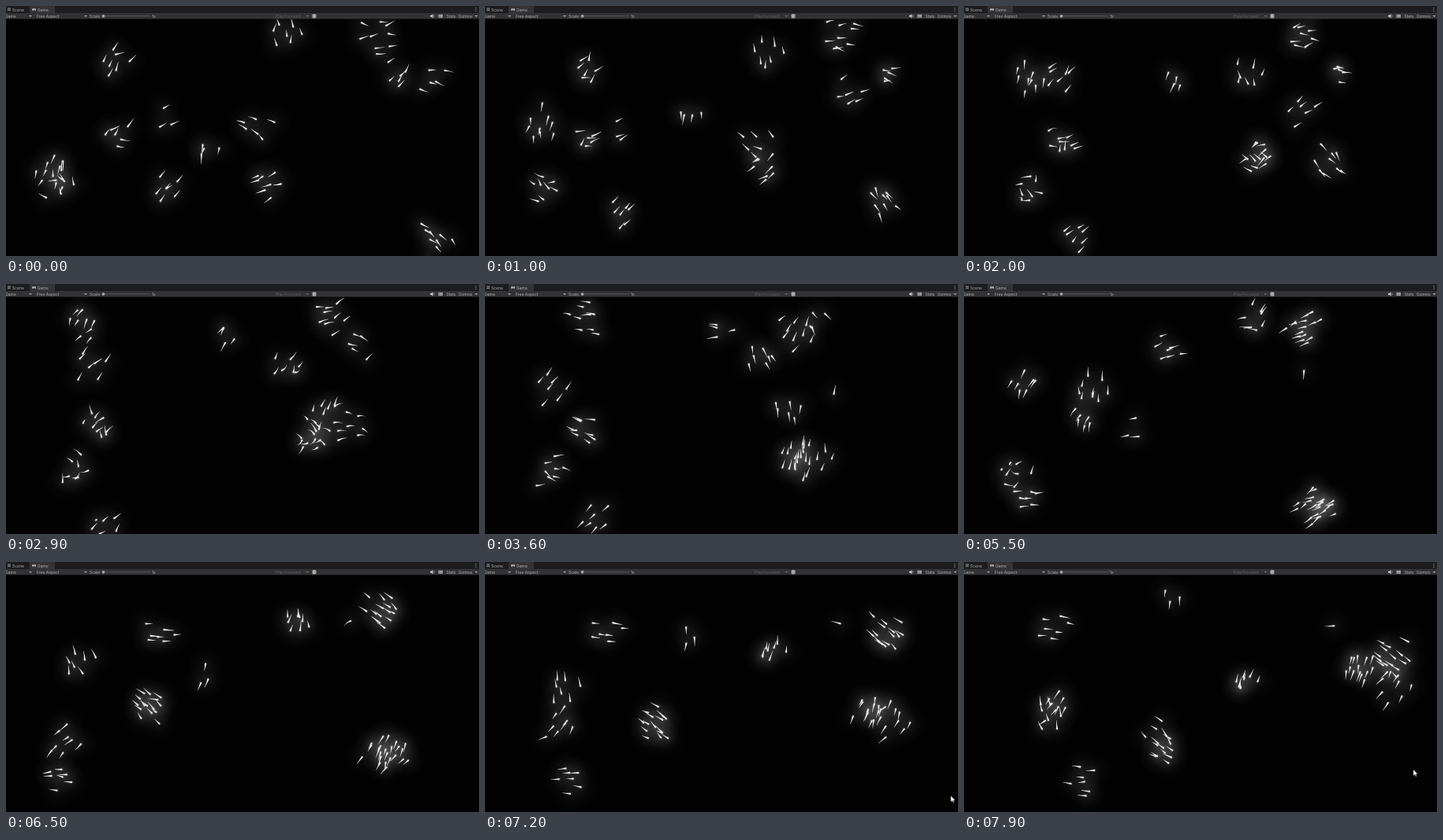
Write an HTML page that moves like this. It is 600x318 px and loops after 8000 ms.

```html
<!DOCTYPE html>
<html lang="en">
<head>
<meta charset="utf-8">
<title>Fish schools</title>
<style>
  html, body { margin: 0; width: 100%; height: 100%; overflow: hidden; background: #020202; }
  svg { display: block; width: 100vw; height: 100vh; }
  text { font: 5px Inter, Roboto, sans-serif; fill: #b4b4b4; }
  .dim { fill: #606060; }
</style>
</head>
<body>
<svg viewBox="0 0 600 318">
  <defs>
    <radialGradient id="halo">
      <stop offset="0" stop-color="#fff" stop-opacity=".16"/>
      <stop offset=".15" stop-color="#fff" stop-opacity=".045"/>
      <stop offset=".5" stop-color="#fff" stop-opacity=".018"/>
      <stop offset="1" stop-color="#fff" stop-opacity="0"/>
    </radialGradient>
  </defs>
  <rect width="600" height="318" fill="#020202"/>
  <g id="halos" fill="url(#halo)"></g>
  <g id="fish" fill="#ececec"></g>

  <g id="bar">
    <rect width="600" height="9" fill="#1d1d1f"/>
    <rect x="30" width="32" height="9" fill="#343436"/>
    <rect y="9" width="600" height="7.5" fill="#333335"/>
    <path d="M0 16.5H600" stroke="#171717" stroke-width=".6"/>
    <path d="M2 3.2H6M2 5.4H6M3 2.3V6.4M5 2.3V6.4" stroke="#aaa" stroke-width=".6"/>
    <path d="M33 3.2H38V5.8H36.2L35.5 5L34.8 5.8H33Z" fill="#aaa"/>
    <text x="8" y="6.6">Scene</text>
    <text x="40" y="6.6">Game</text>
    <text x="-1" y="14.6">Game</text>
    <text x="39" y="14.6">Free Aspect</text>
    <text x="106" y="14.6">Scale</text>
    <path d="M122 12.8H183" stroke="#5c5c5c" stroke-width=".8"/>
    <circle cx="123.5" cy="12.8" r="1.9" fill="#a5a5a5"/>
    <text x="185" y="14.6">1x</text>
    <text x="342" y="14.6" class="dim">Play Focused</text>
    <ellipse cx="391" cy="12.8" rx="2.3" ry="2.8" fill="#aaa"/>
    <path d="M388 11.2H394M388 13H394M388 14.8H394" stroke="#aaa" stroke-width=".6"/>
    <path d="M538 11.8H539.5L541.5 10.2V15.4L539.5 13.8H538Z" fill="#ccc"/>
    <path d="M542.6 11.3Q544 12.8 542.6 14.3" fill="none" stroke="#ccc" stroke-width=".6"/>
    <rect x="548.5" y="10.8" width="5.5" height="4" fill="#aaa"/>
    <path d="M549.3 12H553.2M549.3 13.6H553.2" stroke="#444" stroke-width=".6" stroke-dasharray=".7 .5"/>
    <text x="558.5" y="14.6">Stats</text>
    <text x="574" y="14.6">Gizmos</text>
    <path d="M29 12h4l-2 2zM99 12h4l-2 2zM594.5 12h4l-2 2z" fill="#aaa"/>
    <path d="M380.5 12h4l-2 2z" fill="#707070"/>
    <path d="M596 2.2v1M596 4.2v1M596 6.2v1" stroke="#aaa"/>
  </g>
  <path id="cursor" d="M0 0V8L1.9 6.3L3.1 9L4.3 8.5L3.1 5.8H5.6Z" fill="#fff" stroke="#222" stroke-width=".4"/>
</svg>
<script>
const LOOP = 8, STEP = .1;
const WAYPOINT_TIMES = [0, 2.9, 4.4, 6, 7.9];
const byId = id => document.getElementById(id);

let seed = 11;
const random = () => (seed = seed * 16807 % 2147483647) / 2147483647;
const spread = amount => (random() * 2 - 1) * amount;

function add(parent, tag, attributes = {}) {
  const node = document.createElementNS('http://www.w3.org/2000/svg', tag);
  for (const name in attributes) node.setAttribute(name, attributes[name]);
  return byId(parent).appendChild(node);
}

// Smooth curve through the waypoints; it runs on past both ends.
function route(points, time) {
  const T = WAYPOINT_TIMES, last = T.length - 1;
  let k = 0;
  while (k < last - 1 && time > T[k + 1]) k++;
  const span = T[k + 1] - T[k], u = (time - T[k]) / span;
  const slope = (i, axis) => {
    const a = Math.max(0, i - 1), b = Math.min(last, i + 1);
    return (points[b][axis] - points[a][axis]) / (T[b] - T[a]) * span;
  };
  return [0, 1].map(axis => {
    const p = points[k][axis], q = points[k + 1][axis];
    const m = slope(k, axis), n = slope(k + 1, axis);
    return p + u * (m + u * (3 * (q - p) - 2 * m - n + u * (2 * (p - q) + m + n)));
  });
}

// Fish fill a disc around the school's route, each with its own slow wander.
const fish = [];
function school(count, ...points) {
  const radius = 7 * Math.sqrt(count), turn = random() * 7;
  for (let i = 0; i < count; i++) {
    const r = count > 1 ? radius * Math.sqrt((i + .5) / count) : 0;
    const angle = turn + i * 2.4;
    fish.push({
      points,
      x: r * Math.cos(angle) + spread(3),
      y: r * Math.sin(angle) + spread(3),
      phase: random() * 7,
      pace: 1.4 + spread(.5),
      length: 10.5 + spread(2.5),
      lean: spread(.35),
      halo: add('halos', 'circle', { r: 23 }),
      body: add('fish', 'path')
    });
  }
}

school(9, [540, 295], [432, 178], [412, 284], [475, 266], [542, 155]);
school(8, [332, 222], [395, 188], [392, 284], [460, 268], [500, 135]);
school(6, [498, 90], [404, 165], [404, 282], [480, 262], [505, 130]);
school(9, [472, 38], [412, 42], [388, 88], [458, 50], [547, 118]);
school(4, [545, 92], [442, 72], [397, 24], [368, 55], [355, 154]);
school(4, [252, 180], [276, 64], [328, 62], [370, 58], [355, 154]);
school(7, [355, 33], [357, 104], [330, 62], [222, 92], [112, 80]);
school(6, [318, 155], [385, 200], [385, 92], [455, 55], [545, 130]);
school(9, [60, 210], [100, 49], [165, 68], [168, 165], [250, 228]);
school(6, [142, 165], [114, 180], [147, 187], [165, 172], [252, 240]);
school(8, [66, 225], [90, 240], [68, 236], [66, 240], [115, 182]);
school(7, [203, 234], [128, 310], [157, 273], [60, 275], [155, 278]);
school(7, [138, 72], [106, 106], [62, 165], [88, 118], [108, 195]);
school(3, [195, 142], [115, 185], [147, 187], [238, 168], [258, 42]);
school(1, [525, 100], [464, 92], [432, 174], [433, 85], [474, 74]);

function place({ points, x, y, phase, pace }, time) {
  const [cx, cy] = route(points, time);
  return [
    cx + x + 5 * Math.sin(pace * time + phase),
    cy + y + 5 * Math.cos(pace * time + phase * 2)
  ];
}

function heading(one, time) {
  const [x1, y1] = place(one, time - .15), [x2, y2] = place(one, time + .15);
  return Math.atan2(y2 - y1, x2 - x1) + one.lean * Math.sin(2 * time + one.phase);
}

function drawFish(one, time) {
  const { halo, body, length } = one;
  const [x, y] = place(one, time);
  const now = heading(one, time), past = heading(one, time - .25);
  const dx = Math.cos(now), dy = Math.sin(now), half = length / 2;
  const midX = x - half * dx, midY = y - half * dy;
  const tipX = midX - half * Math.cos(past), tipY = midY - half * Math.sin(past);
  const point = (px, py, side) =>
    `${(px - dy * side).toFixed(2)} ${(py + dx * side).toFixed(2)}`;
  body.setAttribute('d',
    `M${point(x, y, 1.1)}Q${point(midX, midY, .4)} ${point(tipX, tipY, .15)}` +
    `L${point(tipX, tipY, -.15)}Q${point(midX, midY, -.4)} ${point(x, y, -1.1)}` +
    `A1.1 1.1 0 0 1 ${point(x, y, 1.1)}Z`);
  halo.setAttribute('cx', x);
  halo.setAttribute('cy', y);
}

function drawCursor(time) {
  const left = (1 - Math.min(1, Math.max(0, (time - 7.1) / .6))) ** 2;
  byId('cursor').setAttribute('transform', `translate(${570 + 30 * left} ${264 + 48 * left})`);
  byId('cursor').setAttribute('visibility', time > 7.1 ? 'visible' : 'hidden');
}

const start = performance.now();
function tick() {
  const elapsed = (performance.now() - start) / 1000 % LOOP;
  const time = Math.floor(elapsed / STEP) * STEP;
  fish.forEach(one => drawFish(one, time));
  drawCursor(time);
  requestAnimationFrame(tick);
}
tick();
</script>
</body>
</html>
```
